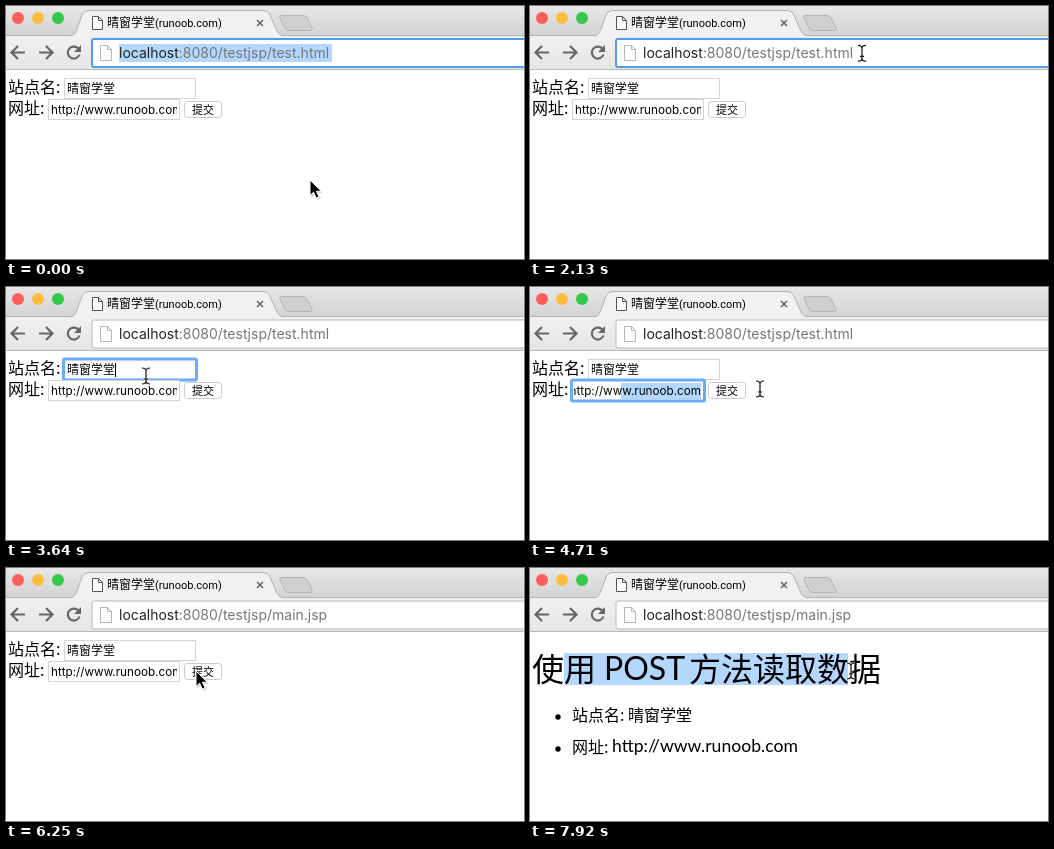
These frames come from a looping animation (518 by 253 pixels, 8000 ms). An HTML page:

```html
<!DOCTYPE html>
<html lang="zh-CN">
<head>
<meta charset="utf-8">
<title>Form post demo</title>
<style>
  html, body { margin: 0; width: 100%; height: 100%; overflow: hidden; background: #fff; }
  svg { display: block; }
  text { font-family: Inter, "Noto Sans CJK SC", "Noto Sans CJK", sans-serif; white-space: pre; }
  .cjk { font-family: "Noto Sans CJK SC", "Noto Sans CJK", sans-serif; font-size: 16px; }
  .tab { font-family: Roboto, "Noto Sans CJK SC", "Noto Sans CJK", sans-serif; font-size: 11px; }
  .geo { font-family: Lato, sans-serif; }
  .small { font-size: 12px; }
  .medium { font-weight: 500; }
  .h1 { font-size: 32px; font-weight: 500; }
  .sel { fill: #b3d7fe; }
  .box { fill: #fff; stroke: #d4d4d4; }
  .ring { fill: none; stroke: #6aacf5; stroke-width: 3; }
  .icon { fill: none; stroke: #666; stroke-width: 2.2; }
  .doc { fill: #fff; stroke: #999; }
</style>
</head>
<body>
<svg width="518" height="253" viewBox="0 0 518 253">
  <defs>
    <linearGradient id="strip" x2="0" y2="1"><stop stop-color="#e7e7e7"/><stop offset="1" stop-color="#d3d3d3"/></linearGradient>
    <linearGradient id="bar" x2="0" y2="1"><stop stop-color="#f1f1f1"/><stop offset="1" stop-color="#e5e5e5"/></linearGradient>
    <clipPath id="clip"><rect x="44" y="95" width="127" height="18"/></clipPath>
  </defs>

  <!-- window frame -->
  <rect width="518" height="30" fill="url(#strip)"/>
  <rect y="29" width="518" height="35" fill="url(#bar)"/>
  <path d="M0 29.5H518" stroke="#b4b4b4"/>
  <path d="M0 63.5H518" stroke="#b9b9b9"/>
  <circle cx="12" cy="12" r="6" fill="#fc5f5a"/>
  <circle cx="32" cy="12" r="6" fill="#fdbd3f"/>
  <circle cx="52" cy="12" r="6" fill="#35c84b"/>
  <path d="M64 30C69 29 69 27 71 23L76 9Q78 4.500 82 4.500H258Q262 4.500 264 9L270 23C272 27 273 29 278 30" fill="#f1f1f1" stroke="#b0b0b0"/>
  <path d="M276 9.500H297Q300 9.500 301 12L306 22Q307 24.500 304 24.500H283Q280 24.500 279 22L274 12Q273 9.500 276 9.500Z" fill="#d0d0d0" stroke="#b3b3b3"/>
  <path d="M86.500 10.500H92.500L96.500 14.500V23.500H86.500ZM92.500 10.500V14.500H96.500" class="doc" style="stroke:#555"/>
  <text class="tab" x="101" y="21"><tspan font-size="12">晴窗学堂</tspan>(runoob.com)</text>
  <path d="M251 14L257 20M257 14L251 20" stroke="#666" stroke-width="1.600"/>
  <path class="icon" d="M19 46.500H6M12 40L5.500 46.500L12 53M33 46.500H46M40 40L46.500 46.500L40 53"/>
  <path class="icon" d="M73 43.500A6 6 0 1 0 73.500 48.500"/>
  <path d="M75 39V46H68Z" fill="#666"/>

  <!-- address bar -->
  <rect id="address" x="86" y="33" width="440" height="28" rx="2" fill="#fff"/>
  <path class="doc" d="M94.500 39.500H101.500L105.500 43.500V54.500H94.500ZM101.500 39.500V43.500H105.500" style="stroke:#b5b5b5"/>
  <rect id="urlSel" class="sel" y="38" height="18"/>
  <text x="113" y="52" font-size="14" fill="#222">localhost<tspan fill="#777">:8080/testjsp/<tspan id="file"></tspan></tspan></text>

  <g id="form">
    <text class="cjk" x="2" y="87">站点名:</text>
    <rect class="box" x="58.500" y="72.500" width="131" height="20"/>
    <rect id="ring1" class="ring" x="57.500" y="72" width="133" height="21" rx="1.500"/>
    <text class="cjk small" x="61" y="87">晴窗学堂</text>
    <path id="caret1" d="M109.500 76V90" stroke="#000"/>

    <text class="cjk" x="2" y="108">网址:</text>
    <rect class="box" x="42.500" y="93.500" width="131" height="20"/>
    <rect id="ring2" class="ring" x="41.500" y="93" width="133" height="21" rx="1.500"/>
    <g clip-path="url(#clip)">
      <rect id="linkSel" class="sel" y="96" height="16"/>
      <text id="link" y="108" font-size="11.700">http://www.runoob.com</text>
    </g>
    <path id="caret2" d="M82.500 97V111" stroke="#000"/>

    <rect id="button" x="178.500" y="95.500" width="37" height="16" rx="3" stroke="#cacaca"/>
    <text class="cjk" x="186" y="108" style="font-size:11px">提交</text>
  </g>

  <g id="result">
    <rect id="headSel" class="sel" x="34" y="85" height="32"/>
    <text class="cjk h1" x="2" y="113">使用</text>
    <text class="geo" x="74" y="112" font-size="32">POST</text>
    <text class="cjk h1" x="159" y="113">方法读取数据</text>
    <circle cx="28" cy="149" r="2.700"/>
    <circle cx="28" cy="181" r="2.700"/>
    <text class="cjk" x="42" y="153"><tspan class="medium">站点名:</tspan> 晴窗学堂</text>
    <text class="cjk medium" x="42" y="185">网址:</text>
    <text class="geo" x="82" y="184" font-size="17.600">http://www.runoob.com</text>
  </g>

  <g id="arrow">
    <path d="M1 2V18L5 14.500L8 20L11 18.500L8.500 13H13Z" fill="#000" opacity=".15"/>
    <path d="M0 0V15.500L3.600 12.200L6.200 18L9 16.800L6.400 11.200H11.300Z" stroke="#fff"/>
  </g>
  <g id="beam" fill="none">
    <path id="beamShape" d="M-4 -8Q0 -8 0 -5Q0 -8 4 -8M0 -5V5M-4 8Q0 8 0 5Q0 8 4 8M-2 3H2" stroke="#fff" stroke-width="2.600" opacity=".7"/>
    <use href="#beamShape" style="display:none"/>
    <path d="M-4 -8Q0 -8 0 -5Q0 -8 4 -8M0 -5V5M-4 8Q0 8 0 5Q0 8 4 8M-2 3H2" stroke="#111" stroke-width="1.200"/>
  </g>
</svg>
<script>
const LOOP = 8000, TICK = 118, LEAD = 18;

// pointer path: tick, x, y
const path = [
  [0, 304, 174], [3, 298, 174], [9, 298, 174], [10, 297, 174], [12, 276, 110],
  [13, 290, 75], [14, 320, 50], [15, 330, 47], [17, 330, 47], [20, 336, 48],
  [21, 336, 48], [22, 361, 49], [23, 300, 50], [24, 212, 51], [25, 130, 48],
  [26, 62, 48], [28, 130, 82], [31, 140, 89], [33, 115, 98], [35, 100, 104],
  [36, 108, 104], [40, 230, 102], [41, 230, 102], [42, 222, 110], [43, 205, 119],
  [44, 150, 118], [45, 84, 105], [46, 115, 107], [47, 188, 106], [48, 188, 106],
  [50, 190, 103], [56, 190, 103], [57, 184, 104], [59, 156, 107], [60, 156, 107],
  [63, 32, 104], [67, 321, 103]
];

const $ = id => document.getElementById(id);
const set = (id, attrs) => { for (const k in attrs) $(id).setAttribute(k, attrs[k]); };
const show = (id, on) => { $(id).style.display = on ? "" : "none"; };
const within = (n, from, to) => n >= from && n < to;

function pointer(n) {
  const i = path.findIndex(p => p[0] >= n);
  if (i < 0) return path[path.length - 1].slice(1);
  if (i === 0) return path[0].slice(1);
  const [a, ax, ay] = path[i - 1], [b, bx, by] = path[i];
  const k = (n - a) / (b - a);
  return [ax + (bx - ax) * k, ay + (by - ay) * k];
}

function select(id, on, from, to) {
  show(id, on && to > from);
  if (on) set(id, { x: from, width: Math.max(0, to - from) });
}

function draw(t) {
  const n = Math.floor((t + LEAD) / TICK);
  const [x, y] = pointer(n);
  const beam = within(n, 14, 26) || within(n, 28, 42) || within(n, 45, 47) || n >= 57;
  show("beam", beam);
  show("arrow", !beam);
  set(beam ? "beam" : "arrow", { transform: `translate(${x} ${y})` });

  const typing = n < 29;
  set("address", { stroke: typing ? "#4f9df0" : "#b8b8b8", "stroke-width": typing ? 2 : 1 });
  const edge = n < 18 || n >= 26 ? 113 : Math.max(113, x - 1);
  select("urlSel", n < 18 || within(n, 23, 29), edge, 326);
  $("file").textContent = n < 53 ? "test.html" : "main.jsp";

  show("form", n < 54);
  show("result", n >= 54);
  show("ring1", within(n, 29, 34));
  show("caret1", within(n, 29, 34));
  show("ring2", within(n, 34, 53));
  show("caret2", within(n, 45, 49));

  const scrolled = within(n, 39, 53);
  set("link", { x: scrolled ? 171 : 45, "text-anchor": scrolled ? "end" : "start" });
  select("linkSel", within(n, 36, 45), scrolled ? 91 : 99, n > 40 ? 171 : Math.min(171, x));
  set("button", { fill: n === 52 ? "#dcdcdc" : "#fff" });
  select("headSel", n >= 64, 34, x - 3);
}

function frame(now) {
  draw(now % LOOP);
  requestAnimationFrame(frame);
}
draw(0);
requestAnimationFrame(frame);
</script>
</body>
</html>
```
